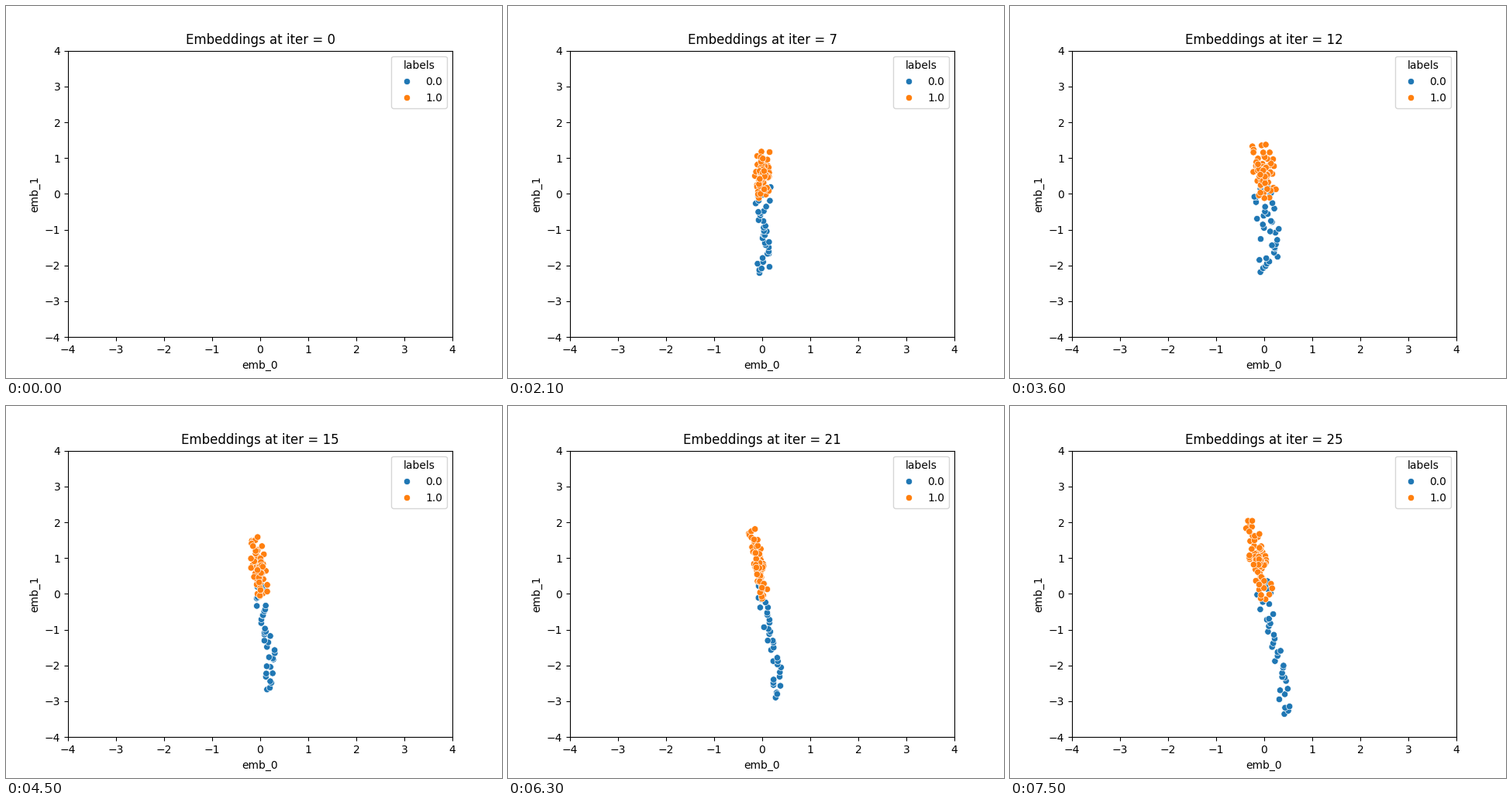
These frames come from a looping animation (640 by 480 pixels, 7800 ms). A matplotlib script:

```python
import matplotlib.pyplot as plt
import numpy as np
from matplotlib.animation import FuncAnimation
from matplotlib.lines import Line2D

FRAMES, INTERVAL = 26, 300
BLUE, ORANGE = "tab:blue", "tab:orange"
N_BLUE, N_ORANGE = 36, 64
N = N_BLUE + N_ORANGE

# Lowest blue dot, highest orange dot and cloud width at a few iterations.
STEPS = [1, 4, 7, 10, 14, 15, 18, 21, 25]
LOW = [-1.1, -1.69, -2.21, -2.04, -2.33, -2.67, -3.13, -2.91, -3.37]
TOP = [.55, .87, 1.18, 1.25, 1.5, 1.59, 1.7, 1.81, 2.04]
WIDTH = [.2, .14, .08, .13, .1, .075, .065, .055, .085]

# Blue dots thin out evenly downwards; orange dots crowd around their middle.
blue_along = 1 - 1.1 * np.linspace(0, 1, N_BLUE)
k = np.linspace(0, 1, N_ORANGE) ** 1.1
orange_along = 1.06 * (k + .11 * np.sin(2 * np.pi * k)) - .06

rng = np.random.default_rng(8)
base_across = rng.normal(size=N)
order = rng.permutation(N_ORANGE)
orange_along = orange_along[order]


def positions(it):
    low, top, width = (np.interp(it, STEPS, v) for v in (LOW, TOP, WIDTH))
    noise = np.random.default_rng(it)
    y = np.concatenate([low * blue_along, top * orange_along])
    y = np.clip(y + noise.normal(0, .04, N), low, top)
    across = (.8 * base_across + .6 * noise.normal(size=N)).clip(-2, 2)
    lean = -.0075 * max(it - 4, 0)
    x = .02 + lean * y + width * across
    return np.column_stack([x, y])


fig, ax = plt.subplots(figsize=(6.4, 4.8), dpi=100)
ax.set(xlim=(-4, 4), ylim=(-4, 4), xlabel="emb_0", ylabel="emb_1")
handles = [Line2D([], [], color=color, label=label, marker="o", linestyle="",
                  markersize=6, markeredgecolor="white", markeredgewidth=.48)
           for label, color in (("0.0", BLUE), ("1.0", ORANGE))]
ax.legend(handles=handles, title="labels", loc="upper right")

dots = ax.scatter(*positions(1).T, c=[BLUE] * N_BLUE + [ORANGE] * N_ORANGE,
                  s=36, edgecolors="white", linewidths=.48)


def draw(it):
    dots.set_offsets(positions(it) if it else np.empty((0, 2)))
    ax.set_title(f"Embeddings at iter = {it}")


anim = FuncAnimation(fig, draw, frames=FRAMES, interval=INTERVAL,
                     repeat=True, repeat_delay=0)
plt.show()
```
